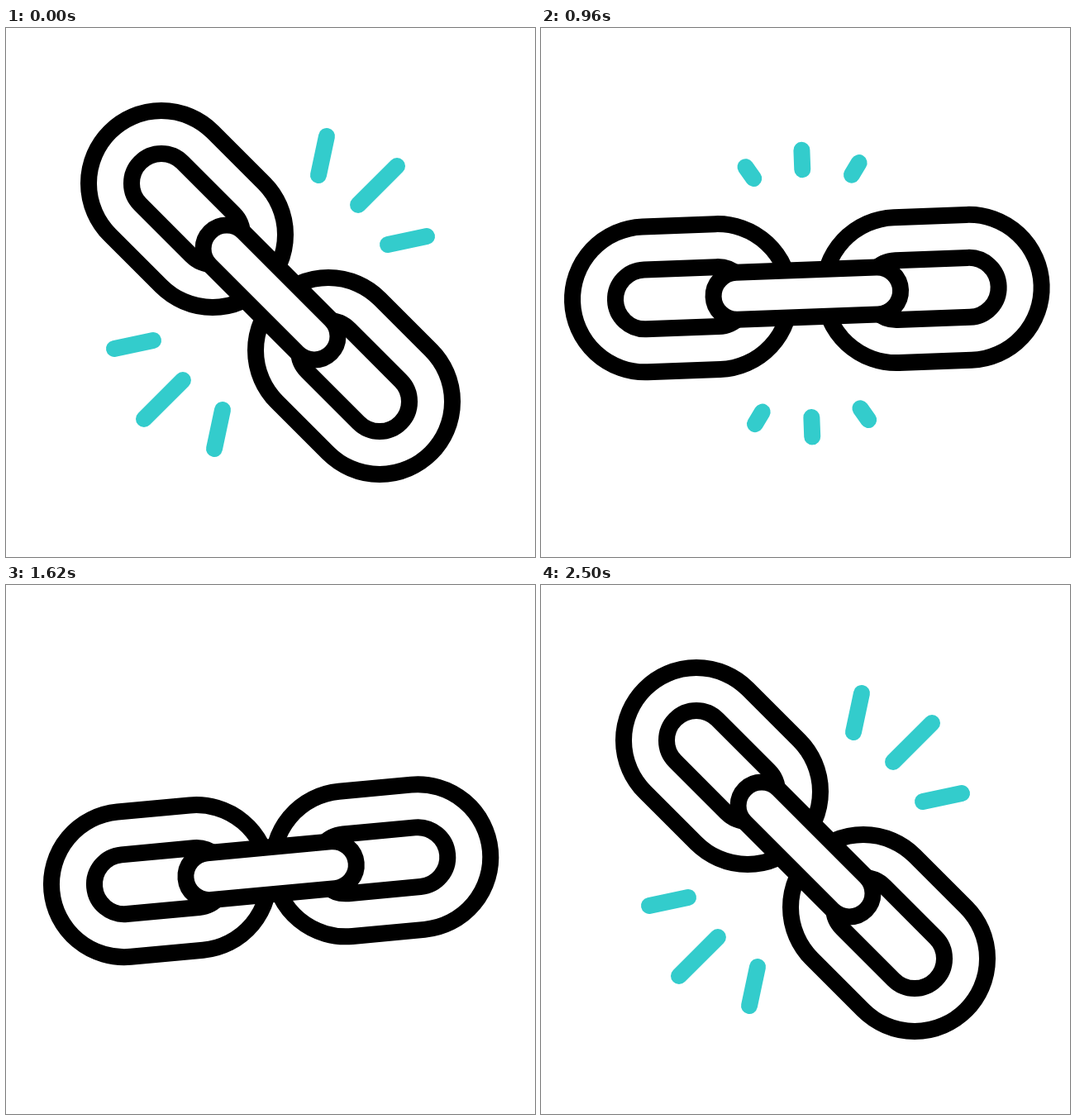
Recreate the animation shown at these times as an HTML page with a canvas. Size 640 by 640 pixels, loop 3 s.

```html
<!DOCTYPE html>
<html lang="en">
<head>
<meta charset="utf-8">
<title>Chain link</title>
<style>
  html, body { margin: 0; width: 100%; height: 100%; overflow: hidden; background: #fff; }
  canvas { display: block; width: 640px; height: 640px; }
</style>
</head>
<body>
<canvas id="stage" width="640" height="640"></canvas>
<script>
const ctx = document.getElementById('stage').getContext('2d');
const LOOP = 3000, STEP = 20;
const BLACK = '#000', WHITE = '#fff', TEAL = '#33cccc';
const LINK_LENGTH = 87.7;

// Eased 0 to 1 between two times.
function ease(t, start, end) {
  const s = Math.min(1, Math.max(0, (t - start) / (end - start)));
  return s * s * (3 - 2 * s);
}

function capsule(x, length, radius) {
  ctx.beginPath();
  ctx.arc(x, 0, radius, Math.PI / 2, Math.PI * 1.5);
  ctx.arc(x + length, 0, radius, -Math.PI / 2, Math.PI / 2);
  ctx.closePath();
}

function drawLink(x) {
  for (const radius of [88, 36]) {
    capsule(x, LINK_LENGTH, radius);
    ctx.stroke();
  }
}

function drawChain(spread, barHalf) {
  ctx.strokeStyle = BLACK;
  const inner = 99 + spread;
  drawLink(inner);
  drawLink(-inner - LINK_LENGTH);
  capsule(-barHalf, 2 * barHalf, 28.5);
  ctx.fillStyle = WHITE;
  ctx.fill();
  ctx.stroke();
}

// A fan of three strokes; the outer two are shorter and lean away.
function drawFan(from, to) {
  for (let i = -1; i <= 1; i++) {
    const outer = Math.abs(i);
    const length = 66.4 - 18.3 * outer;
    ctx.save();
    ctx.translate(59.4 * i, -150 + 8.6 * outer);
    ctx.rotate(0.576 * i);
    ctx.beginPath();
    ctx.moveTo(0, -length * from);
    ctx.lineTo(0, -length * to);
    ctx.stroke();
    ctx.restore();
  }
}

// Head and tail count bursts: the part between them is visible.
function drawSparks(t) {
  const head = 1 + ease(t, 800, 1200) + ease(t, 1800, 2200);
  const tail = ease(t, 200, 600) + ease(t, 1200, 1600);
  if (head <= tail) return;
  const burst = Math.floor(tail);
  ctx.strokeStyle = TEAL;
  for (let side = 0; side < 2; side++) {
    drawFan(tail - burst, head - burst);
    ctx.rotate(Math.PI);
  }
}

function draw(t) {
  const swing = ease(t, 200, 1300) - ease(t, 1300, 2500);
  const squash = ease(t, 200, 660) - ease(t, 1730, 2200);
  const pull = ease(t, 715, 1200) - ease(t, 1200, 1640);

  ctx.setTransform(1, 0, 0, 1, 0, 0);
  ctx.fillStyle = WHITE;
  ctx.fillRect(0, 0, 640, 640);
  ctx.translate(320 + 0.6 * squash + 2.4 * pull, 320 + 26 * squash - 49 * pull);
  ctx.rotate((45 - 61 * swing) * Math.PI / 180);
  ctx.lineWidth = 20;
  ctx.lineCap = 'round';
  drawChain(35 * pull - 8.5 * squash, 74.9 + 19.5 * pull);
  drawSparks(t);
}

function tick() {
  const t = performance.now() % LOOP;
  draw(Math.floor(t / STEP) * STEP);
  requestAnimationFrame(tick);
}
tick();
</script>
</body>
</html>
```
